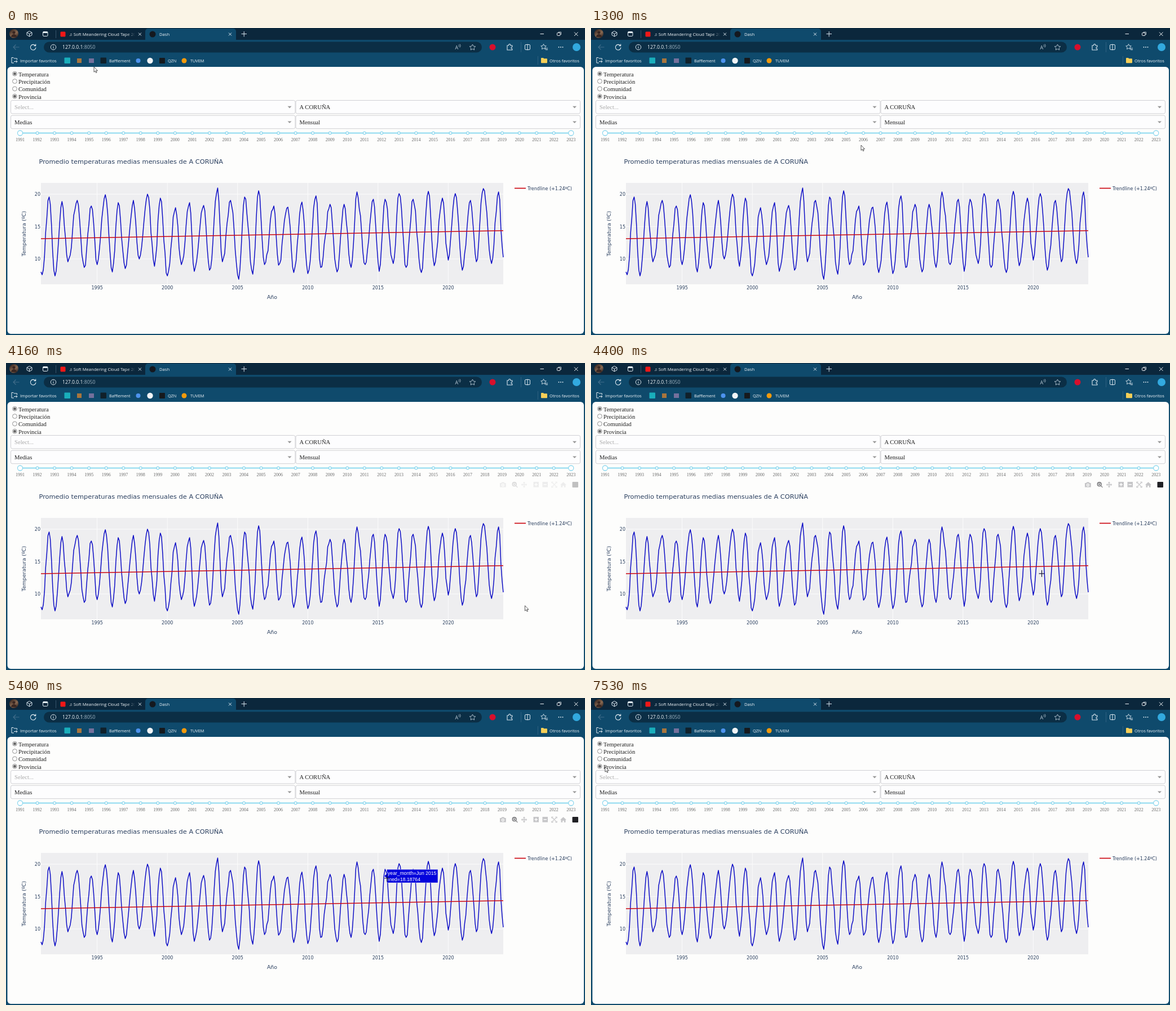
An HTML page with a canvas for the animation above (8000 ms loop, 1027x545 px).

```html
<!DOCTYPE html>
<html lang="es">
<head>
<meta charset="utf-8">
<title>Dash</title>
<style>
  html, body { margin: 0; width: 100%; height: 100%; overflow: hidden; background: #0f4a6c; }
  canvas, svg { position: absolute; left: 0; top: 0; width: 100vw; height: 100vh; display: block; }
  text { white-space: pre; }
  .ui { font-family: "Open Sans", "Noto Sans", sans-serif; font-size: 7.6px; fill: #f2f6f9; }
  .form { font-family: "Liberation Serif", serif; font-size: 10.67px; fill: #222; }
  .mark { font-family: "Liberation Serif", serif; font-size: 8px; fill: #6a6a6a; text-anchor: middle; }
  .plot { font-family: "DejaVu Sans", sans-serif; font-size: 8px; fill: #2a3f5f; }
  .tip { font-family: "Liberation Sans", sans-serif; font-size: 8.67px; fill: #fff; }
  .mid { text-anchor: middle; }
  .end { text-anchor: end; }
</style>
</head>
<body>
<canvas id="scene"></canvas>
<svg id="labels" viewBox="0 0 1027 545" preserveAspectRatio="none">
  <defs>
    <linearGradient id="fade" gradientUnits="userSpaceOnUse" x1="214" y1="0" x2="229" y2="0">
      <stop offset="0" stop-color="#f2f6f9"/><stop offset="1" stop-color="#f2f6f9" stop-opacity="0"/>
    </linearGradient>
  </defs>
</svg>
<svg viewBox="0 0 1027 545" preserveAspectRatio="none">
  <g id="modebar" fill="#c6c6c8" stroke="none">
    <path fill-rule="evenodd" d="M876 213h2.4l1-1.5h4l1 1.5h2.4v7.5h-10.8zM881.4 214a2.6 2.6 0 1 0 .01 0zm0 1.3a1.3 1.3 0 1 1-.01 0z"/>
    <g fill="none" stroke="#77777a" stroke-width="1.6"><circle cx="901.7" cy="215.2" r="3.3"/><path d="M904.2 217.6l3.2 3.2M900 215.2h3.4M901.7 213.5v3.4" stroke-width="1.2"/></g>
    <path d="M919 210.6l2.2 2.6h-1.5v2.1h2.1v-1.5l2.6 2.2-2.6 2.2v-1.5h-2.1v2.1h1.5l-2.2 2.6-2.2-2.6h1.5v-2.1h-2.1v1.5l-2.6-2.2 2.6-2.2v1.5h2.1v-2.1h-1.5z"/>
    <path fill-rule="evenodd" d="M935.5 211h9.5v9.5h-9.5zM939.5 213v2h-2v1.5h2v2h1.5v-2h2v-1.5h-2v-2z"/>
    <path fill-rule="evenodd" d="M951.5 211h9.5v9.5h-9.5zM953.5 215v1.5h5.5v-1.5z"/>
    <path d="M968 213.5V211.500h2.500M974.500 211.500h2.500v2M977 218.500v2h-2.500M970.500 220.500H968v-2M969.500 213l6 6M975.500 213l-6 6" fill="none" stroke="#c6c6c8" stroke-width="1.4"/>
    <path d="M983 216.200l5.500-5 5.500 5h-1.500v4.500h-2.700v-3h-2.600v3h-2.700v-4.500z"/>
    <rect x="1004.500" y="211" width="10.500" height="10" rx="1" fill="#202024"/>
  </g>
  <g id="tip">
    <path d="M670.500 316l5-4v-7.700h90.500v23.700h-90.500v-8z" fill="#0404dc" stroke="#e8e8f4" stroke-width=".5"/>
    <text class="tip" x="677" y="313.600">year_month=Jun 2015</text>
    <text class="tip" x="677" y="324.800">med=18.18764</text>
  </g>
  <path id="cross" d="M-5 0H5M0-6V6" stroke="#16163a" stroke-width="1.2"/>
  <path id="arrow" d="M0 0V9.200L2.200 7.300 3.600 10.500 5.100 9.800 3.700 6.800H6.500Z" fill="#fff" stroke="#222" stroke-width=".75"/>
</svg>
<script>
const W = 1027, H = 545, LOOP = 8000;
const $ = id => document.getElementById(id);
const ctx = $('scene').getContext('2d');

function fill(d, color) {
  ctx.fillStyle = color;
  ctx.fill(new Path2D(d), 'evenodd');
}
function line(d, color = '#dbe6ee', width = 1) {
  ctx.strokeStyle = color;
  ctx.lineWidth = width;
  ctx.stroke(new Path2D(d));
}
function box(x, y, w, h, r, color, edge) {
  ctx.beginPath();
  ctx.roundRect(x, y, w, h, r);
  if (color) { ctx.fillStyle = color; ctx.fill(); }
  if (edge) { ctx.strokeStyle = edge; ctx.lineWidth = 1; ctx.stroke(); }
}
function disc(x, y, r, color, edge, width = 1) {
  ctx.beginPath();
  ctx.arc(x, y, r, 0, 7);
  if (color) { ctx.fillStyle = color; ctx.fill(); }
  if (edge) { ctx.strokeStyle = edge; ctx.lineWidth = width; ctx.stroke(); }
}
function label(str, x, y, cls, attrs = {}) {
  const el = document.createElementNS('http://www.w3.org/2000/svg', 'text');
  el.textContent = str;
  el.setAttribute('class', cls);
  for (const [k, v] of Object.entries({ x, y, ...attrs })) el.setAttribute(k, v);
  $('labels').append(el);
}

function star(x, y, r) {
  let d = '';
  for (let i = 0; i < 10; i++) {
    const a = i * Math.PI / 5 - Math.PI / 2, q = i % 2 ? r * .5 : r;
    d += (i ? 'L' : 'M') + (x + q * Math.cos(a)) + ' ' + (y + q * Math.sin(a));
  }
  return d + 'Z';
}

function drawTabs() {
  box(0, 0, W, 21, 0, '#0b273c');
  box(0, 21, W, H - 21, 0, '#0f4a6c');
  box(247, 1, 161, 22, [5, 5, 0, 0], '#0f4a6c');

  const photo = ctx.createLinearGradient(8, 2, 20, 18);
  photo.addColorStop(0, '#2c1d1a');
  photo.addColorStop(.55, '#8a6a52');
  photo.addColorStop(1, '#241a1c');
  disc(14, 10, 8, photo);
  disc(14, 8, 2.600, '#3a2722');
  fill('M9 16a5 5 0 0 1 10 0z', '#3a2722');

  line('M37 8l4.500-2.500 4.500 2.500v4.500l-4.500 2.500-4.500-2.500zM37 8l4.500 2.500 4.500-2.500M41.500 10.500v4.500');
  box(65.500, 6.500, 8.500, 8, 1.500, null, '#e4edf3');
  box(65.500, 6.500, 8.500, 2.500, 1, '#e4edf3');
  line('M88.500 4v14', '#36536a');
  box(96.500, 6.500, 9, 9, 1.500, '#f01818');
  disc(260, 11, 5.500, '#14181f');
  for (const x of [237.500, 397.500]) line(`M${x - 2.500} 8.500l5 5m0-5l-5 5`);
  line('M417.500 10.500h9.500M422.200 6v9.500');
  line('M947.500 10.500h6.500M1008 7.500l6.500 6.500m0-6.500l-6.500 6.500', '#f0f4f7');
  box(977.500, 8.500, 5.500, 5, 1, null, '#f0f4f7');
  line('M979.500 7.200h5v4.800', '#f0f4f7', .8);
  label('♫ Soft Meandering Cloud Tape 20', 112, 13.500, 'ui', { fill: 'url(#fade)', style: 'fill:url(#fade)' });
  label('Dash', 272, 13.500, 'ui');
}

function drawToolbar() {
  line('M23.500 34h-10.500m4.500-4.500l-4.500 4.500 4.500 4.500', '#456f8c', 1.100);
  line('M52 31.200a4.800 4.800 0 1 0 1 3.300M52.700 28.500v3.200h-3.200', '#e4edf3', 1.100);
  box(67, 24.500, 777, 19, 9.500, '#0b2e45');
  disc(84, 34, 4.700, null, '#dbe6ee');
  line('M84 33.200v3.300M84 31.200v1');
  label('127.0.0.1', 100, 37.400, 'ui', { style: 'font-size:8.600px' });
  label(':8050', 136.500, 37.400, 'ui', { style: 'font-size:8.600px;fill:#9db3c2' });
  label('A', 796.500, 38, 'ui', { style: 'font-size:9px;fill:#b9cad6' });
  line('M803 29.500q1.500 2 0 4M805 28.500q2.500 3 0 6', '#b9cad6', .8);
  line(star(827.500, 34.500, 5.500), '#b9cad6', .9);
  disc(863, 34, 5.500, '#d80f2c');
  line('M889 31h2.500q0-2.500 1.700-2.500t1.700 2.500h3v2.800q-2 0-2 1.600t2 1.600v2h-8.900zM889 31', '#dbe6ee', 1.100);
  line('M913.500 25v18', '#2d6080');
  box(920.500, 29.500, 9, 9, 1.500, null, '#dbe6ee');
  line('M925 28.500v11');
  line(star(953.500, 33.500, 5), '#dbe6ee', .9);
  line('M956 36h5m-4 2.500h4', '#dbe6ee');
  for (const x of [980.500, 984, 987.500]) disc(x, 34, .9, '#e4edf3');
  disc(1012, 34, 7, '#32a9df');
}

function drawBookmarks() {
  line('M19.500 56.500v-2.500h-5l-1.500-1.500h-3v9.500h4M14 59.500h6m-2.200-2.200l2.200 2.200-2.200 2.200', '#e4edf3');
  box(103.500, 52.500, 10.500, 10.500, 1, '#19aebb');
  box(126, 54, 8, 8, 0, '#a8753d');
  box(147, 54, 9, 8, 0, '#74709c');
  box(167.500, 52.500, 10.500, 10.500, 1, '#10202a');
  disc(234.500, 58, 4, '#4d93ee');
  disc(255.500, 58, 5.200, '#f2f5f7');
  box(272, 53, 10, 10, 1, '#16191d');
  disc(316, 58, 4.500, '#f29a0c');
  line('M943.500 50v15', '#2d6080');
  fill('M949 54q0-1 1-1h3l1.200 1.300h4.800q1 0 1 1v6q0 1-1 1h-9q-1 0-1-1z', '#f6cf57');
  label('Importar favoritos', 25, 60.600, 'ui');
  label('Bafflement', 183, 60.600, 'ui', { style: 'font-size:7.300px' });
  label('QZN', 287, 60.600, 'ui', { style: 'font-size:7.300px' });
  label('TUVEM', 327, 60.600, 'ui', { style: 'font-size:7.300px' });
  label('Otros favoritos', 964, 60.600, 'ui');
}

function drawForm() {
  box(2.500, 69, 1022.500, 474, 6, '#fdfdfc');
  ['Temperatura', 'Precipitación', 'Comunidad', 'Provincia'].forEach((name, i) => {
    const y = 81.200 + i * 13.330;
    disc(15.500, y, 3.900, '#fff', '#757575', .8);
    if (i % 3 === 0) disc(15.500, y, 2.500, '#686868');
    label(name, 22, y + 4.600, 'form');
  });
  [['Select...', 'A CORUÑA'], ['Medias', 'Mensual']].forEach((row, r) => row.forEach((name, c) => {
    const x = 8.500 + c * 505.500, y = 128.500 + r * 26.700;
    box(x, y, 504.500, 23.500, 2.700, '#fdfdfe', '#d0d0d4');
    fill(`M${x + 491} ${y + 10.200}h7l-3.500 3.700z`, '#999');
    label(name, x + 6.500, y + 15.500, 'form', name === 'Select...' ? { style: 'fill:#aaa' } : {});
  }));
  line('M25 186.500H1002', '#a0e0f2', 2.700);
  for (let i = 0; i <= 32; i++) {
    const x = 25 + i * 30.540, end = i % 32 === 0;
    disc(x, 186.500, end ? 4.500 : 2.300, '#fff', '#8ed8ee', 1.300);
    label(1991 + i, x, 201, 'mark');
  }
}

// One row per year: month and height of the winter low, month and height of the summer high.
const SEASONS = [
  [1, 438, 7, 300], [0, 440, 6, 308], [-1, 415, 7, 306], [1, 425, 7, 316], [0, 420, 7, 296],
  [1, 433, 6, 310], [0, 427, 7, 306], [0, 410, 7, 295], [1, 423, 6, 302], [0, 440, 7, 319],
  [0, 420, 7, 310], [-1, 432, 7, 315], [0, 430, 7, 284], [-1, 415, 6, 306], [1, 446, 6, 300],
  [1, 437, 6, 289], [-1, 420, 7, 316], [-1, 421, 7, 318], [0, 434, 7, 309], [0, 436, 7, 298],
  [-1, 425, 7, 313], [1, 433, 7, 313], [1, 425, 6, 291], [1, 420, 8, 304], [1, 432, 6, 304],
  [1, 418, 6, 294], [0, 425, 6, 304], [1, 434, 7, 290], [0, 422, 7, 302], [0, 412, 6, 294],
  [0, 430, 7, 306], [0, 415, 6, 285], [1, 418, 7, 291]
];
const monthX = m => 62 + m * 820 / 395;
const jitter = m => {
  const s = Math.sin(m * 12.989 + 4.100) * 43758.545;
  return (s - Math.floor(s)) * 2 - 1;
};

function seriesPath() {
  const knots = [[0, 433]];
  SEASONS.forEach(([lo, loY, hi, hiY], i) => knots.push([i * 12 + lo, loY], [i * 12 + hi, hiY]));
  knots.push([395, 407]);
  let d = 'M62 433';
  for (let k = 1; k < knots.length; k++) {
    const [m0, y0] = knots[k - 1], [m1, y1] = knots[k];
    for (let m = m0 + 1; m <= m1; m++) {
      const u = (m - m0) / (m1 - m0);
      const ease = (1 - Math.cos(Math.PI * u)) / 2;
      const y = y0 + (y1 - y0) * ease + jitter(m) * 9 * Math.sin(Math.PI * u);
      d += `L${monthX(m)} ${y}`;
    }
  }
  return d;
}

function drawChart() {
  box(62, 275, 820, 180, 0, '#eeeef0');
  for (let i = 0; i < 6; i++) {
    const x = monthX(48 + i * 60);
    line(`M${x} 275V455`, '#fdfdfd', .9);
    label(1995 + i * 5, x, 464, 'plot mid');
  }
  [20, 15, 10].forEach((v, i) => {
    const y = 295 + i * 57.500;
    line(`M62 ${y}H882`, '#fdfdfd', .9);
    label(v, 61, y + 3, 'plot end');
  });
  ctx.lineJoin = 'round';
  line(seriesPath(), '#0808c4', 1.450);
  line('M62 374L882 359.800', '#cc0712', 1.500);
  line('M902 284.500h20', '#cc0712', 1.700);
  label('Promedio temperaturas medias mensuales de A CORUÑA', 58.500, 241, 'plot', { style: 'font-size:11.360px' });
  label('Trendline (+1.24ºC)', 925, 287.500, 'plot');
  label('Año', 472, 481, 'plot mid', { style: 'font-size:9.330px' });
  label('Temperatura (ºC)', 0, 0, 'plot mid', { style: 'font-size:9.330px', transform: 'translate(34.500 365) rotate(-90)' });
}

function drawScene() {
  const scale = Math.max(1, devicePixelRatio || 1);
  ctx.canvas.width = W * scale;
  ctx.canvas.height = H * scale;
  ctx.scale(scale, scale);
  drawTabs();
  drawToolbar();
  drawBookmarks();
  drawForm();
  drawChart();
}

// Pointer path: time, x, y.
const MOVES = [
  [30, 156, 69], [180, 350, 150], [300, 468, 204], [460, 468, 204], [630, 479, 208],
  [2760, 479, 208], [2830, 353, 166], [3730, 353, 166], [3930, 931, 448], [4100, 931, 448],
  [4160, 921, 431], [4400, 800, 374], [4600, 704, 330], [4730, 676, 320],
  [6260, 676, 320], [6460, 817, 248], [6900, 817, 248], [7060, 480, 190],
  [7200, 120, 138], [7300, 25, 122]
];
function pointer(t) {
  const i = MOVES.findIndex(m => m[0] > t);
  if (i === 0) return MOVES[0].slice(1);
  if (i < 0) return MOVES[MOVES.length - 1].slice(1);
  const [t0, x0, y0] = MOVES[i - 1], [t1, x1, y1] = MOVES[i];
  const u = (t - t0) / (t1 - t0);
  return [x0 + (x1 - x0) * u, y0 + (y1 - y0) * u];
}
const ramp = (t, start, span) => Math.min(1, Math.max(0, (t - start) / span));

function frame(now) {
  const t = now % LOOP;
  const [x, y] = pointer(t);
  const inPlot = x > 62 && x < 882 && y > 275 && y < 455 && t > 4100;
  const at = `translate(${x} ${y})`;
  $('arrow').setAttribute('transform', at);
  $('cross').setAttribute('transform', at);
  $('arrow').style.opacity = inPlot ? 0 : 1;
  $('cross').style.opacity = inPlot ? 1 : 0;
  $('modebar').style.opacity = ramp(t, 4080, 300) - ramp(t, 7010, 280);
  $('tip').style.opacity = t >= 4660 && t < 6300 ? 1 : 0;
  requestAnimationFrame(frame);
}

drawScene();
requestAnimationFrame(frame);
</script>
</body>
</html>
```
